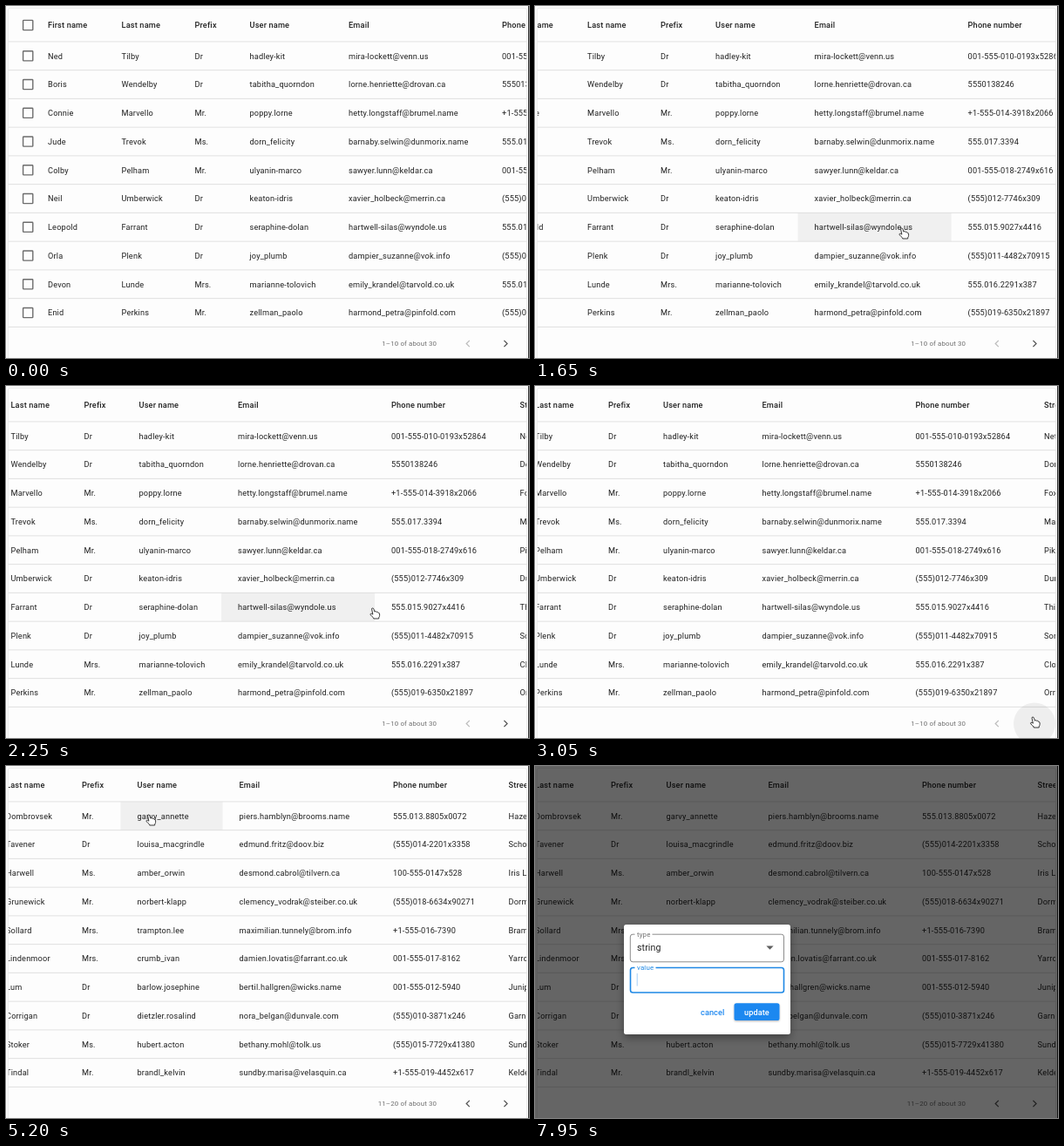
Animation of 600x404 px, one loop 8 s. Source, as an HTML page:

```html
<!DOCTYPE html>
<html lang="en">
<head>
<meta charset="utf-8">
<title>Table cell editing</title>
<style>
  html, body { margin: 0; width: 100%; height: 100%; overflow: hidden; background: #fdfdfd; }
  svg { display: block; width: 600px; height: 404px; }
  text { font: 400 9.2px Roboto, sans-serif; letter-spacing: .01786em; fill: rgba(0,0,0,.87); white-space: pre; }
  .head { font-weight: 500; }
  .small { font-size: 7.9px; fill: rgba(0,0,0,.56); }
  .input { font-size: 10.6px; letter-spacing: .0094em; }
  .button { font-weight: 500; letter-spacing: .008em; fill: #1e88f0; }
  .line { stroke: #dadada; stroke-width: .8; fill: none; }
  .edge { stroke: #e8e8e8; stroke-width: .8; fill: none; }
  .box { fill: none; stroke: #6c6c6c; stroke-width: 1.4; }
</style>
</head>
<body>
<svg viewBox="0 0 600 404">
  <defs>
    <clipPath id="inside"><rect x="2.5" y="2" width="594.5" height="402"/></clipPath>
    <filter id="shadow" x="-20%" y="-20%" width="140%" height="150%">
      <feDropShadow dx="0" dy="4" stdDeviation="5" flood-opacity=".35"/>
    </filter>
    <filter id="lift" x="-20%" y="-20%" width="140%" height="170%">
      <feDropShadow dx="0" dy="1" stdDeviation=".8" flood-opacity=".3"/>
    </filter>
  </defs>
  <rect width="600" height="404" fill="#fdfdfd"/>
  <g clip-path="url(#inside)">
    <rect id="hover" fill="#f0f0f0"/>
    <g id="table"></g>
  </g>
  <g id="lines"></g>
  <rect class="edge" x="2.3" y="2.3" width="595.2" height="420" rx="2.5"/>
  <rect x="599" width="1" height="404" fill="#333"/>
  <circle id="halo" cx="573" cy="387.5" r="24" fill="rgba(0,0,0,.06)"/>
  <text id="range" class="small" x="494.2" y="390.4" text-anchor="end"></text>
  <g fill="none" stroke-width="1.3">
    <path id="prev" d="M531.8 383.9l-3.6 3.6 3.6 3.6"/>
    <path id="next" d="M571.4 383.9l3.6 3.6-3.6 3.6" stroke="#555"/>
  </g>
  <g id="pointer" stroke-width=".9" stroke-linejoin="round">
    <path id="hand" fill="#fff" stroke="#222" d="M-1.9 1.2Q-2.2 0-1 0T.5 1.2L1.4 4.2Q2 3.4 2.9 3.7T3.8 4.6Q4.4 4 5.1 4.4T5.8 5.5Q7 5.2 7.1 6.8V8.4Q7 10 6.2 10.8V12H.2V11.2Q-1.4 9.8-3.2 7.8Q-4 6.7-3 6.3T-.6 7.2Z"/>
    <path id="arrow" fill="#111" stroke="#fff" d="M0 0V10.6L2.4 8.4 4 12.2 5.8 11.4 4.2 7.8H7.4Z"/>
  </g>
  <rect id="scrim" width="600" height="404"/>
  <g id="overArrow"><use href="#arrow" stroke-width=".9"/></g>
  <g id="dialog">
    <rect x="102" y="182" width="191" height="126" rx="2.7" fill="#fff" filter="url(#shadow)"/>
    <rect x="109.3" y="193.2" width="176.2" height="31.6" rx="2.8" fill="none" stroke="#8c8c8c"/>
    <rect x="114.5" y="191" width="20" height="5" fill="#fff"/>
    <text class="small" x="117" y="195.8">type</text>
    <text class="input" x="117" y="212.3">string</text>
    <path d="M265.4 206.6h8.2l-4.1 4.2z" fill="#5f5f5f"/>
    <rect id="field" x="109.5" y="231.5" width="176" height="28.5" rx="2.8" fill="none"/>
    <rect x="114.5" y="229" width="24" height="5" fill="#fff"/>
    <text id="label" class="small" x="117" y="234.2">value</text>
    <text id="value" class="input" x="117" y="249"></text>
    <rect id="caret" y="238" width="1" height="14.5" fill="#1e88f0"/>
    <text class="button" x="190" y="285.6">cancel</text>
    <rect x="228.5" y="272.2" width="52" height="19.8" rx="2.6" fill="#1e88f0" filter="url(#lift)"/>
    <text class="button" x="240" y="285.6" style="fill:#fff">update</text>
  </g>
</svg>
<script>
const LOOP = 8000, TOP = 40.9, ROW = 32.75, PAD = 19, USER = 'garvy_annette';
const $ = id => document.getElementById(id);

const heads = ['First name', 'Last name', 'Prefix', 'User name', 'Email', 'Phone number', 'Street'];
const pages = [
  { range: '1–10 of about 30', prev: '#bdbdbd', cols: [48, 132.5, 216.5, 279.5, 393, 569, 716.5, 860], rows: `
Ned|Tilby|Dr|hadley-kit|mira-lockett@venn.us|001-555-010-0193x52864|Nettle Row
Boris|Wendelby|Dr|tabitha_quorndon|lorne.henriette@drovan.ca|5550138246|Dorsal Way
Connie|Marvello|Mr.|poppy.lorne|hetty.longstaff@brumel.name|+1-555-014-3918x2066|Foxley Rise
Jude|Trevok|Ms.|dorn_felicity|barnaby.selwin@dunmorix.name|555.017.3394|Marrow Lane
Colby|Pelham|Mr.|ulyanin-marco|sawyer.lunn@keldar.ca|001-555-018-2749x616|Pikes Court
Neil|Umberwick|Dr|keaton-idris|xavier_holbeck@merrin.ca|(555)012-7746x309|Dunnet Row
Leopold|Farrant|Dr|seraphine-dolan|hartwell-silas@wyndole.us|555.015.9027x4416|Thimble Way
Orla|Plenk|Dr|joy_plumb|dampier_suzanne@vok.info|(555)011-4482x70915|Sorrel Rise
Devon|Lunde|Mrs.|marianne-tolovich|emily_krandel@tarvold.co.uk|555.016.2291x387|Clover Lane
Enid|Perkins|Mr.|zellman_paolo|harmond_petra@pinfold.com|(555)019-6350x21897|Orrin Court` },
  { range: '11–20 of about 30', prev: '#555', cols: [48, 132.5, 219.5, 283, 400, 576.5, 709, 860], rows: `
|Dombrovsek|Mr.|${USER}|piers.hamblyn@brooms.name|555.013.8805x0072|Hazel Row
|Tavener|Dr|louisa_macgrindle|edmund.fritz@doov.biz|(555)014-2201x3358|Schorn Way
|Harwell|Ms.|amber_orwin|desmond.cabrol@tilvern.ca|100-555-0147x528|Iris Lane
|Grunewick|Mr.|norbert-klapp|clemency_vodrak@steiber.co.uk|(555)018-6634x90271|Dormer Rise
|Sollard|Mrs.|trampton.lee|maximilian.tunnely@brom.info|+1-555-016-7390|Bramble Way
|Lindenmoor|Mrs.|crumb_ivan|damien.lovatis@farrant.co.uk|001-555-017-8162|Yarrow Row
|Lum|Dr|barlow.josephine|bertil.hallgren@wicks.name|001-555-012-5940|Juniper Way
|Corrigan|Dr|dietzler.rosalind|nora_belgan@dunvale.com|(555)010-3871x246|Garnet Lane
|Stoker|Ms.|hubert.acton|bethany.mohl@tolk.us|(555)015-7729x41380|Sundew Row
|Tindal|Mr.|brandl_kelvin|sundby.marisa@velasquin.ca|+1-555-019-4452x617|Kelder Rise` }
];

// Tracks: [time, value...]
const scroll = [[900, 0], [1100, 4], [1300, 17], [1500, 46], [1700, 81], [1950, 110.5], [2250, 127], [2600, 132.5]];
const path = [
  [250, 371, 383], [400, 421.5, 255], [2450, 421.5, 255], [2600, 573, 379],
  [2899, 278, 223], [2900, 278, 223], [3050, 572, 380], [4000, 572, 380], [4300, 290, 163],
  [4500, 290, 163], [4800, 176, 84], [5000, 176, 84], [5200, 164.5, 56]
];
const shown = [[250, 2650], [2900, 6800]];
const blink = [[6450, 1], [6600, 0], [6650, 0], [6750, 1], [7800, 1], [8050, 0]];

const smooth = k => k * k * (3 - 2 * k);
const clamp = k => Math.min(1, Math.max(0, k));

function at(track, t, ease = k => k) {
  const i = track.findIndex(p => p[0] > t);
  if (i === 0) return track[0].slice(1);
  if (i < 0) return track[track.length - 1].slice(1);
  const a = track[i - 1], b = track[i], k = ease((t - a[0]) / (b[0] - a[0]));
  return a.slice(1).map((v, n) => v + (b[n + 1] - v) * k);
}

function set(el, attrs) {
  for (const key in attrs) el.setAttribute(key, attrs[key]);
  return el;
}

function add(parent, tag, attrs, text = '') {
  const el = set(document.createElementNS('http://www.w3.org/2000/svg', tag), attrs);
  el.textContent = text;
  return parent.appendChild(el);
}

const show = (el, on) => el.style.display = on ? '' : 'none';

for (const page of pages) {
  const g = page.el = add($('table'), 'g', {});
  const check = y => add(g, 'rect', { class: 'box', x: 19.6, y: y - 5.6, width: 11.2, height: 11.2, rx: .7 });
  check(22);
  heads.forEach((h, c) => add(g, 'text', { class: 'head', x: page.cols[c], y: 25.2 }, h));
  page.rows.trim().split('\n').forEach((row, r) => {
    const mid = TOP + ROW * (r + .5);
    check(mid);
    row.split('|').forEach((s, c) => add(g, 'text', { x: page.cols[c], y: mid + 3.4 }, s));
  });
}
for (let i = 0; i <= 10; i++) {
  add($('lines'), 'path', { class: 'line', d: `M2.5 ${TOP + ROW * i}H597.5` });
}

function drawPointer(t, page, x0) {
  const [x, y] = at(path, t, smooth);
  const on = shown.some(([a, b]) => t >= a && t < b);
  const modal = t >= 5950;
  const row = Math.floor((y - TOP) / ROW);
  const inRow = row >= 0 && row < 10;
  const onNext = Math.hypot(x - 573, y - 387.5) < 24;
  const hand = inRow || onNext;
  show($('pointer'), on && !modal);
  show($('overArrow'), on && modal);
  show($('hand'), hand);
  $('arrow').style.visibility = hand && !modal ? 'hidden' : 'visible';
  set($('pointer'), { transform: `translate(${x} ${y})` });
  set($('overArrow'), { transform: `translate(${x + .3} ${y - 1.5})` });
  show($('halo'), on && onNext);

  const c = page.cols.findLastIndex(left => left - PAD <= x + x0);
  const cell = on && inRow && c >= 0 && c < 7;
  show($('hover'), cell);
  if (cell) set($('hover'), {
    x: page.cols[c] - PAD - x0, y: TOP + ROW * row,
    width: page.cols[c + 1] - page.cols[c], height: ROW
  });
}

function drawDialog(t) {
  const k = clamp((t - 5910) / 90);
  set($('scrim'), { opacity: .6 * k });
  show($('dialog'), k > 0);
  if (!k) return;
  const s = .85 + .15 * k;
  set($('dialog'), { opacity: k, transform: `translate(197.5 245) scale(${s}) translate(-197.5 -245)` });

  const focus = clamp((t - 5950) / 150);
  set($('field'), { stroke: focus < .6 ? '#3a7fc4' : '#1e88e5', 'stroke-width': 1.1 + .5 * focus });
  $('label').style.fill = focus < .6 ? '#3a7fc4' : '#1e88e5';

  const gone = t < 6800 ? 0 : Math.ceil((t - 6750) / 450 * USER.length);
  const text = USER.slice(0, Math.max(0, USER.length - gone));
  $('value').textContent = text;
  set($('caret'), { x: 117 + (text ? $('value').getComputedTextLength() : -.3), opacity: at(blink, t)[0] });
}

function draw(now) {
  const t = now % LOOP;
  const page = pages[t < 3400 ? 0 : 1];
  const x0 = at(scroll, t)[0];
  pages.forEach(p => show(p.el, p === page));
  set($('table'), { transform: `translate(${-x0} 0)` });
  $('range').textContent = page.range;
  set($('prev'), { stroke: page.prev });
  drawPointer(t, page, x0);
  drawDialog(t);
  requestAnimationFrame(draw);
}
draw(performance.now());
</script>
</body>
</html>
```
